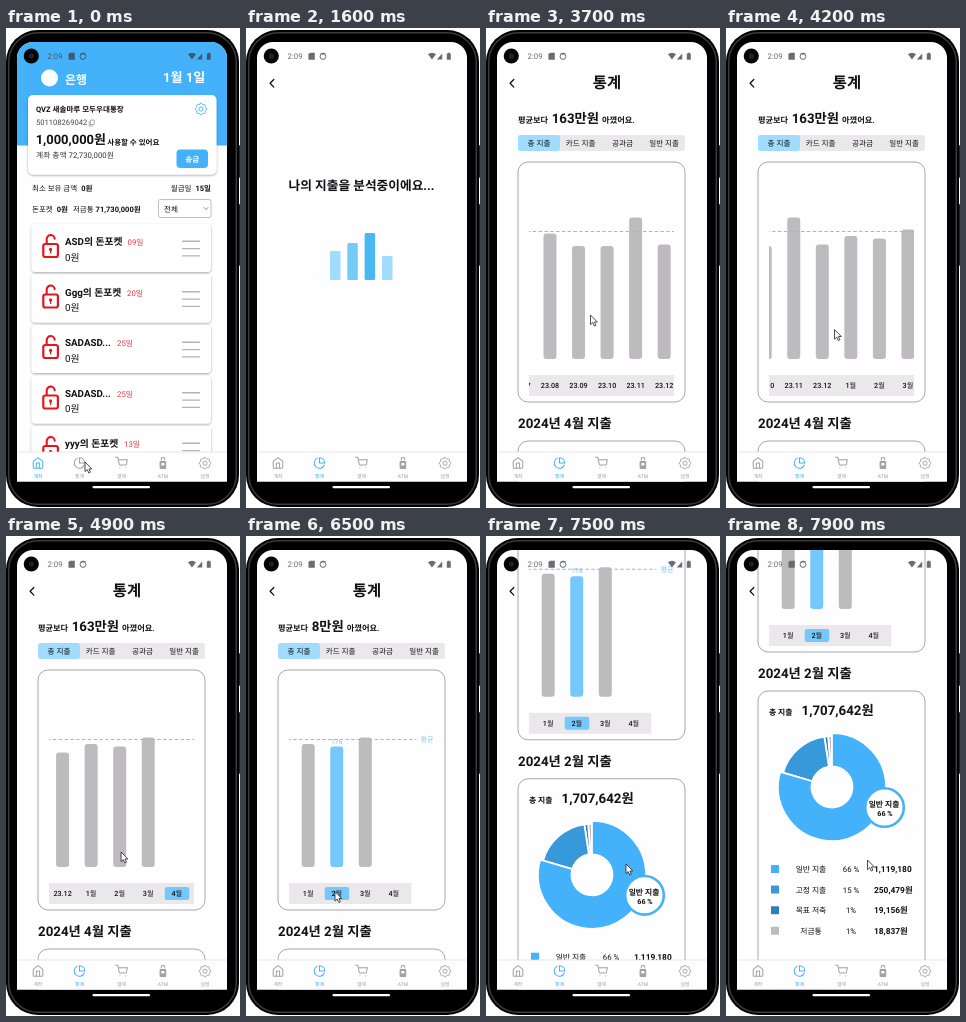
Write an HTML page that moves like this. It is 234x480 px and loops after 8000 ms.

```html
<!DOCTYPE html>
<html lang="ko">
<head>
<meta charset="utf-8">
<title>Banking app</title>
<style>
  html, body { margin: 0; width: 100%; height: 100%; overflow: hidden; background: #fff; }
  svg { display: block; width: 100vw; height: 100vh; }
  text { font-family: Roboto, "Noto Sans CJK KR", "Noto Sans CJK", sans-serif; white-space: pre; text-rendering: geometricPrecision; }
</style>
</head>
<body>
<svg id="stage" viewBox="0 0 234 480"></svg>
<script>
const LOOP = 8000;
const BLUE = '#43b2fb', SKY = '#74c8fc', GREY = '#bdbbbd', PALE = '#eae8eb', INK = '#111';
const PAPER = '#fefdff', IDLE = '#a2a2a2';

// --- drawing helpers ---
const text = (x, y, size, body, { w = 400, fill = INK, anchor = 'start', id = '' } = {}) =>
  `<text ${id && `id="${id}"`} x="${x}" y="${y}" font-size="${size}" font-weight="${w}" fill="${fill}" text-anchor="${anchor}">${body}</text>`;
const mid = (x, y, size, body, opts = {}) => text(x, y, size, body, { ...opts, anchor: 'middle' });
const span = (body, attrs = 'font-weight="700"') => `<tspan ${attrs}>${body}</tspan>`;
const rect = (x, y, w, h, r, fill, extra = '') =>
  `<rect x="${x}" y="${y}" width="${w}" height="${h}" rx="${r}" fill="${fill}" ${extra}/>`;
const line = (d, color, width = 1, extra = '') =>
  `<path d="${d}" fill="none" stroke="${color}" stroke-width="${width}" stroke-linecap="round" stroke-linejoin="round" ${extra}/>`;
const group = (id, body, extra = '') => `<g id="${id}" ${extra}>${body}</g>`;
const polar = (cx, cy, r, deg) => {
  const a = deg * Math.PI / 180;
  return `${(cx + r * Math.sin(a)).toFixed(2)} ${(cy - r * Math.cos(a)).toFixed(2)}`;
};

// An outline icon drawn on a 24-unit grid, centred on cx, cy.
const icon = (cx, cy, d) =>
  line(d, 'currentColor', 1.9, `transform="translate(${cx} ${cy}) scale(.53) translate(-12 -12)"`);

function gear(cx, cy, r, color) {
  const points = Array.from({ length: 32 }, (_, i) => polar(cx, cy, i % 4 < 2 ? r : r * 0.82, i * 11.25 - 5.6));
  return line(`M${points.join('L')}Z`, color, 0.9) +
    `<circle cx="${cx}" cy="${cy}" r="${r * 0.36}" fill="none" stroke="${color}" stroke-width=".9"/>`;
}

function slice(cx, cy, from, to, outer, inner, color) {
  const large = to - from > 180 ? 1 : 0;
  return `<path d="M${polar(cx, cy, outer, from)}A${outer} ${outer} 0 ${large} 1 ${polar(cx, cy, outer, to)}
    L${polar(cx, cy, inner, to)}A${inner} ${inner} 0 ${large} 0 ${polar(cx, cy, inner, from)}Z"
    fill="${color}" stroke="#fff" stroke-width="1.8"/>`;
}

// --- home screen ---
function pocket(y, name, day, dayX) {
  const red = '#e3161d';
  return rect(25.5, y, 179.5, 48, 4, '#fff', 'filter="url(#shadow)"') +
    rect(37.3, y + 20, 14.6, 13, 2, '#fff', `stroke="${red}" stroke-width="2.2"`) +
    line(`M40.7 ${y + 19.5}v-4a4 4 0 0 1 8 -.8`, red, 2.1) +
    `<circle cx="44.6" cy="${y + 25.4}" r="1.6" fill="${red}"/>` + line(`M44.6 ${y + 26}v2.8`, red, 1.3) +
    text(59, y + 21, 9.8, name, { w: 700 }) +
    text(dayX, y + 21, 7.8, day, { fill: '#dd3a40' }) +
    text(59, y + 36.5, 9.8, '0원') +
    [17.3, 24.6, 31.9].map(dy => line(`M176.5 ${y + dy}h17`, '#b4b4b4', 1.4)).join('');
}

function homeScreen() {
  const pockets = [
    ['ASD의 돈포켓', '09일', 121.5], ['Ggg의 돈포켓', '20일', 121], ['SADASD...', '25일', 111],
    ['SADASD...', '25일', 111], ['yyy의 돈포켓', '13일', 118]
  ];
  return rect(11, 14, 210, 103.5, 0, BLUE) +
    '<circle cx="43.5" cy="50" r="8.5" fill="#fff"/>' +
    text(59, 55.5, 12, '은행', { w: 700, fill: '#fff' }) +
    text(157, 53.8, 13.1, '1월 1일', { w: 700, fill: '#fff' }) +
    rect(22, 67, 188.5, 79.5, 5, '#fff', 'filter="url(#shadow)"') +
    text(30, 83.8, 7.55, 'QVZ 새솔마루 모두우대통장', { w: 700 }) +
    gear(195, 81, 5.8, BLUE) +
    text(30, 97.3, 7.6, '501108269042', { fill: '#444' }) +
    line('M84.8 92h3.5v4.5h-3.5zM83.2 93.5v4.5h3.5', '#777', 0.6) +
    text(29.7, 115.5, 12.95, '1,000,000원', { w: 700 }) +
    text(101.3, 117, 7.5, '사용할 수 있어요', { w: 700 }) +
    text(30, 130, 7.8, '계좌 총액 72,730,000원', { fill: '#333' }) +
    rect(170.5, 121.5, 31.5, 18.5, 4, BLUE) +
    mid(186.2, 134, 7.6, '송금', { w: 700, fill: '#fff' }) +
    text(26, 163, 7.5, '최소 보유 금액' + span('0원', 'font-weight="700" dx="4"')) +
    text(205, 163, 7.5, '월급일' + span('15일', 'font-weight="700" dx="4"'), { anchor: 'end' }) +
    text(26, 183.5, 7.5, '돈포켓' + span('0원', 'font-weight="700" dx="4"') + span('저금통', 'dx="5"') +
      span('71,730,000원', 'font-weight="700" dx="2"')) +
    rect(152.5, 171.5, 52.5, 18, 2, '#fff', 'stroke="#b0b0b0" stroke-width=".8"') +
    text(158, 183.5, 7.6, '전체') + line('M198 179.5l2 2.2 2-2.2', '#777', 0.8) +
    pockets.map((p, i) => pocket(196 + i * 50.5, ...p)).join('');
}

// --- loading screen ---
const LOADERS = [
  { x: 84, phase: -0.52, color: '#a0dcfb' }, { x: 101.3, phase: 0.17, color: '#74cbf8' },
  { x: 118.6, phase: 1.57, color: '#4ab8f3' }, { x: 136, phase: 4.3, color: '#a0dcfb' }
];
const loadingScreen = () =>
  mid(115.5, 161.5, 12.7, '나의 지출을 분석중이에요...', { w: 700 }) +
  LOADERS.map((b, i) => rect(b.x, 223, 10.5, 29, 1.5, b.color, `id="loader${i}"`)).join('');

// --- statistics screen ---
const MONTHS = ['23.05', '23.06', '23.07', '23.08', '23.09', '23.10', '23.11', '23.12', '1월', '2월', '3월', '4월'];
const BAR_TOPS = [194, 188.5, 187.5, 205.5, 218, 218, 189.5, 216.5, 208, 210.5, 201.5];
const FEBRUARY = 9, APRIL = 11;
const monthX = i => 62.5 + i * 28.55;

function chart() {
  const bars = BAR_TOPS.map((top, i) =>
    rect(monthX(i) - 6.5, top, 13, 331 - top, 3, GREY, `id="bar${i}"`)).join('');
  const labels = MONTHS.map((m, i) => mid(monthX(i), 360.3, 7.2, m, { w: 500 })).join('');
  return rect(32, 134, 167, 240, 10, PAPER, 'stroke="#929292" stroke-width=".8"') +
    `<g clip-path="url(#chartClip)">` + group('chartScroll',
      rect(43, 347, 351, 21, 0, PALE) + rect(0, 351, 24.5, 13, 2, SKY, 'id="monthMark"') + labels + bars +
      line('M44 203.5H399', '#7fc4e4', 1, 'stroke-dasharray="3.4 2.4" style="stroke-linecap:butt"') +
      text(403.3, 206, 7, '평균', { fill: SKY }) +
      mid(monthX(FEBRUARY), 207.5, 6.8, '176', { fill: SKY, id: 'barValue' })) + '</g>';
}

function spending() {
  const cx = 106, cy = 509;
  const rows = [
    ['일반 지출', '66 %', '1,119,180', 66, BLUE], ['고정 지출', '15 %', '250,479원', 15, '#3799da'],
    ['목표 저축', '1%', '19,156원', 1, '#2d7fba'], ['저금통', '1%', '18,837원', 1, GREY]
  ];
  const total = rows.reduce((sum, r) => sum + r[3], 0);
  let angle = 0;
  const slices = rows.map(([, , , share, color], i) => {
    const from = angle;
    angle += share / total * 360;
    return slice(cx, cy, from, angle, i ? 51 : 54, 20.5, color);
  });
  const legend = rows.map(([name, percent, amount, , color], i) => {
    const y = 594 + i * 20.6;
    return rect(45, y - 7, 8, 8, 0.5, color) + mid(85, y, 7.8, name) + mid(125, y, 7.8, percent) +
      text(148, y, 8.4, amount, { w: 700 });
  });
  return rect(32, 413, 167, 290, 10, PAPER, 'stroke="#929292" stroke-width=".8"') +
    text(43, 437, 7.8, '총 지출', { w: 700 }) + text(75.5, 437.3, 13.3, '1,707,642원', { w: 700 }) +
    slices.reverse().join('') +
    `<circle cx="158.5" cy="529.5" r="19.3" fill="#fff" stroke="${BLUE}" stroke-width="2.6"/>` +
    mid(158, 529, 7.8, '일반 지출', { w: 700 }) + mid(159, 538, 7.2, '66 %', { w: 700 }) +
    legend.join('');
}

function statsScreen() {
  const tabs = ['총 지출', '카드 지출', '공과금', '일반 지출'];
  return mid(121, 59.5, 15.4, '통계', { w: 700 }) +
    text(32, 94.5, 8.2, '평균보다' + span('', 'id="saved" dx="3.6" font-size="13.3"') + span('아꼈어요.', 'dx="3"'), { w: 700 }) +
    rect(32, 107, 167, 16, 3, PALE) + rect(32, 107, 42, 16, 3, '#9fdcfe') +
    tabs.map((name, i) => mid(53 + i * 41.7, 118, 7.6, name)).join('') +
    chart() + text(32, 400, 13.3, '', { w: 700, id: 'spendTitle' }) + spending();
}

// --- phone chrome ---
function navBar() {
  const item = (x, label, picture) =>
    picture + `<text x="${x}" y="449.5" font-size="5" text-anchor="middle" fill="currentColor">${label}</text>`;
  const c = 'currentColor';
  return rect(11, 424, 210, 30, 0, PAPER) + line('M11 424H221', '#ddd', 0.7) +
    group('navHome', item(32, '계좌',
      icon(32, 435, 'M3 9l9-7 9 7v11a2 2 0 0 1-2 2H5a2 2 0 0 1-2-2zM9 22V12h6v10'))) +
    group('navStats', item(73.5, '통계',
      icon(73.5, 435, 'M21.2 15.9A10 10 0 1 1 8 2.8M22 12A10 10 0 0 0 12 2v10z'))) +
    group('navRest',
      item(115.5, '결제',
        icon(115.5, 435, 'M1 1h4l2.7 13.4a2 2 0 0 0 2 1.6h9.7a2 2 0 0 0 2-1.6L23 6H6M9 21h.1M20 21h.1')) +
      item(157, 'ATM', rect(153.6, 433, 6.6, 8, 1, c) + line('M155.3 432v-2.3h3.2v2.3', c) + rect(155.4, 435, 3, 2.4, 0, '#fff')) +
      item(199, '설정', gear(199, 435.2, 5.8, c)), `color="${IDLE}"`);
}

const statusBar = () =>
  text(41.5, 31, 7.8, '2:09', { fill: 'currentColor' }) +
  '<path d="M64 24.8h4.8v7h-6.3v-5.5z" fill="currentColor"/>' +
  '<circle cx="77" cy="28.5" r="2.9" fill="none" stroke="currentColor" stroke-width="1"/>' +
  '<path d="M74 26.2a4 4 0 0 1 6 0z" fill="currentColor"/>' +
  '<path d="M182 26.2q4-3 8 0l-4 5.3zM190.8 31.5h5.4v-6zM200.8 25.6h1v-.9h2v.9h1v6.2h-4z" fill="currentColor"/>';

const phoneBody = () =>
  rect(231, 117, 3, 33, 1, '#222') + rect(231, 176, 3, 62, 1, '#222') +
  rect(0, 2, 233, 477, 32, '#000') +
  rect(2.7, 4.7, 227.6, 471.6, 29.5, 'none', 'stroke="#3b3b3d" stroke-width="1.5"');

const stage = document.getElementById('stage');
stage.innerHTML = `<defs>
    <clipPath id="screenClip"><path d="M11 453.5V30a16 16 0 0 1 16-16H205a16 16 0 0 1 16 16V453.5Z"/></clipPath>
    <clipPath id="chartClip"><rect x="43" y="135" width="145" height="238"/></clipPath>
    <filter id="shadow" x="-10%" y="-20%" width="120%" height="150%">
      <feDropShadow dx="0" dy="1" stdDeviation="1.3" flood-color="#000" flood-opacity=".35"/>
    </filter>
  </defs>` + phoneBody() +
  `<g clip-path="url(#screenClip)">` + rect(11, 14, 210, 440, 0, PAPER) +
  group('home', homeScreen()) + group('loading', loadingScreen()) + group('stats', statsScreen()) +
  group('back', line('M27.8 51.5l-3.7 3.8 3.7 3.8', '#111', 1.3)) + navBar() +
  group('status', statusBar()) + '</g>' +
  '<circle cx="25.3" cy="28" r="7.6" fill="#050505"/><circle cx="25.3" cy="28" r="2" fill="#1c1c22" stroke="#34343c" stroke-width=".8"/>' +
  rect(86.5, 458, 57.5, 2.2, 1, '#fff') +
  group('cursor', '<path d="M0 0V9.6L2.2 7.6 3.8 11 5.4 10.2 3.9 7H6.8Z" fill="#fff" stroke="#222" stroke-width=".8" stroke-linejoin="round"/>');

const parts = Object.fromEntries([...stage.querySelectorAll('[id]')].map(node => [node.id, node]));

// --- motion ---
const OPEN = 500, LOADED = 1700, PICK = 5900;
const CHART_SCROLL = [[3300, 0], [3700, 84], [4200, 166], [4600, 186], [5250, 228.7]];
const PAGE_SCROLL = [[6720, 0], [7500, 170], [7900, 258]];
const CURSOR = [
  [1900, 5, 474], [2300, 110, 340], [2700, 150, 230], [3200, 100.5, 272.5], [4200, 108.5, 301.5],
  [5000, 116, 318], [5700, 89, 355.5], [6600, 89, 355.5], [7100, 138, 330], [7500, 140, 328], [7900, 141.5, 324]
];

function track(keys, t, column = 1) {
  const next = keys.findIndex(k => k[0] > t);
  if (next === 0) return keys[0][column];
  if (next < 0) return keys[keys.length - 1][column];
  const a = keys[next - 1], b = keys[next];
  return a[column] + (b[column] - a[column]) * (t - a[0]) / (b[0] - a[0]);
}

const show = (node, on) => node.setAttribute('display', on ? 'inline' : 'none');
const move = (node, x, y) => node.setAttribute('transform', `translate(${x.toFixed(2)} ${y.toFixed(2)})`);

function render(t) {
  const atHome = t < OPEN, atStats = t >= LOADED, picked = t >= PICK;
  show(parts.home, atHome);
  show(parts.loading, !atHome && !atStats);
  show(parts.stats, atStats);
  show(parts.back, !atHome);
  parts.status.setAttribute('color', atHome ? '#3f5a72' : '#6c6c6c');
  parts.navHome.setAttribute('color', atHome ? BLUE : IDLE);
  parts.navStats.setAttribute('color', atHome ? IDLE : BLUE);

  LOADERS.forEach((b, i) => {
    const h = 35 + 12 * Math.sin((t - 1600) / 150 + b.phase);
    parts['loader' + i].setAttribute('y', 252 - h);
    parts['loader' + i].setAttribute('height', h);
  });

  move(parts.stats, 0, -track(PAGE_SCROLL, t));
  move(parts.chartScroll, -track(CHART_SCROLL, t), 0);
  parts.saved.textContent = picked ? '8만원' : '163만원';
  parts.spendTitle.textContent = `2024년 ${picked ? 2 : 4}월 지출`;
  parts.monthMark.setAttribute('x', monthX(picked ? FEBRUARY : APRIL) - 12);
  parts['bar' + FEBRUARY].setAttribute('fill', picked ? SKY : GREY);
  show(parts.barValue, picked);

  show(parts.cursor, t < 1100 || t >= 1900);
  if (t < 1100) move(parts.cursor, 79, 434);
  else move(parts.cursor, track(CURSOR, t, 1), track(CURSOR, t, 2));
}

const start = performance.now();
function tick() {
  render((performance.now() - start) % LOOP);
  requestAnimationFrame(tick);
}
tick();
</script>
</body>
</html>
```
